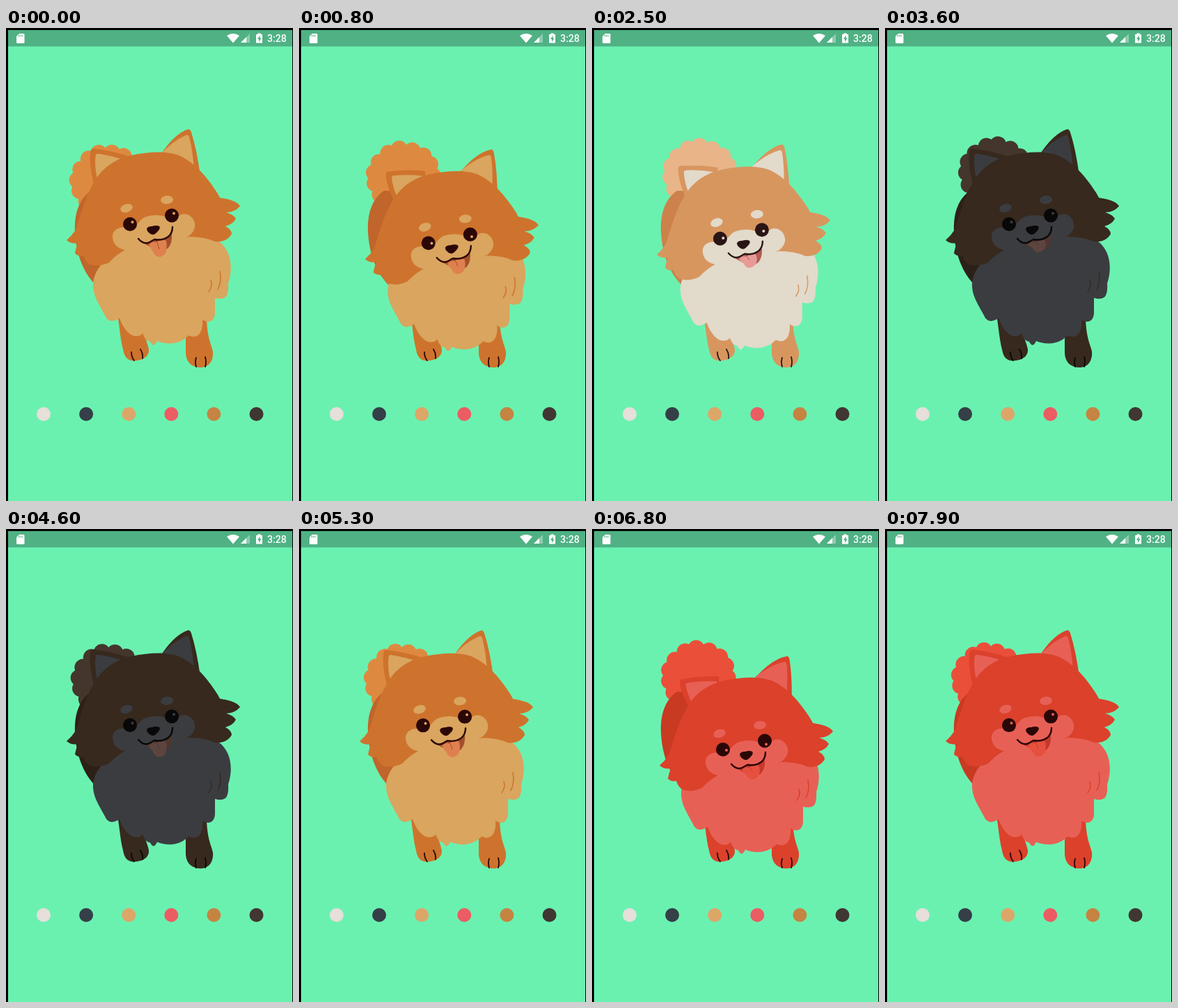
An HTML page that plays this animation: 412 by 680 pixels, repeating every 8000 ms.

```html
<!DOCTYPE html>
<html lang="en">
<head>
<meta charset="utf-8">
<title>Pomeranian</title>
<style>
html, body { margin: 0; width: 100%; height: 100%; overflow: hidden; background: #000; }
svg { display: block; width: 412px; height: 680px; }
.fur { fill: var(--fur); }
.body { fill: var(--body); }
.light { fill: var(--light); }
.tail { fill: var(--tail); }
.dark { fill: var(--dark); }
.mouth { fill: var(--mouth); }
.tongue { fill: var(--tongue); }
.line { fill: none; stroke: var(--dark); stroke-width: 2.4; stroke-linecap: round; stroke-linejoin: round; }
.thin { stroke-width: 1.8; }
.crease { fill: none; stroke: var(--fur); stroke-width: 1.5; stroke-linecap: round; }
.fold { fill: none; stroke: var(--mouth); stroke-width: 1; }
text { font: 500 14px Roboto, sans-serif; fill: #fff; }
</style>
</head>
<body>
<svg viewBox="0 0 412 680">
  <path fill="#6af1b0" d="M3 3h408v677H3z"/>
  <path fill="#4fb184" d="M3 3h408v23.5H3z"/>
  <g fill="#fff">
    <path d="M19 8h6q1.500 0 1.500 1.500v11q0 1.500-1.500 1.500h-8.500q-1.500 0-1.500-1.500V12z"/>
    <path d="M317 11q9-6 18 0l-9 10.500z"/>
    <path opacity=".35" d="M350 8v13h-13z"/>
    <path d="M345 13v8h-8z"/>
    <path d="M361.500 7.500h4V9h2.500v12.500h-9V9h2.500z"/>
    <path fill="#4fb184" d="M364.500 10.500l-3.500 5.500h2v4l3.500-5.500h-2z"/>
  </g>
  <path stroke="#4fb184" stroke-width="1" d="M18.500 10v2.500M20.800 10v2.500M23 10v2.500"/>
  <text x="375" y="20">3:28</text>

  <g id="dog">
    <path id="tail" class="tail"/>
    <path class="body" d="M122 234C102 248 98 272 99 293C101 328 112 352 128 369L190 365V235z"/>
    <path class="fur" d="M159 405C163 428 164 447 168 462C170 476 178 480 188 478C199 477 206 470 205 462C204 454 198 446 198 425z"/>
    <path class="fur" d="M258 425V468C259 482 268 488 279 488C292 488 298 478 297 465C295 455 289 447 288 418z"/>
    <path class="line thin" d="M180 466q0 7 4 12M193 462q4 6 3 13M273 474q-2 6 0 13M286 473q2 7 0 14"/>
    <g id="chest">
      <path class="light" d="M172 316C145 326 124 348 125 372C126 389 138 404 144 417C149 423 156 422 163 417C168 432 178 444 188 443Q193 443 196 439Q200 450 207 451Q212 461 217 450C231 456 250 455 262 442Q273 447 279 438Q283 430 282 419C291 426 300 421 300 409V388Q309 391 315 387Q320 382 319 367C327 343 322 319 306 307Q285 296 255 300z"/>
      <path class="crease" d="M294 363q3 8-3 16M307 350q3 14-3 26"/>
    </g>
    <g id="head">
      <g id="earL">
        <path class="fur" d="M127 227C121 207 119 185 122 175Q124 172 130 174Q155 177 178 185L165 225z"/>
        <path class="light" d="M132 220C128 207 127 190 129 182Q130 180 134 181Q154 184 173 191L160 222z"/>
      </g>
      <g id="earR">
        <path class="fur" d="M222 182Q241 153 260 146Q264 144 266 150Q274 175 279 213L240 220z"/>
        <path class="light" d="M221 182Q242 160 259 154Q262 153 263 157Q268 175 270 204L245 215z"/>
      </g>
      <path class="fur" d="M126 222C138 202 154 189 180 183C207 177 232 177 248 183C264 190 276 202 284 211C294 223 304 237 307 244C318 246 331 248 336 256C331 262 324 265 316 265Q326 268 330 274Q326 282 315 285Q324 290 324 296C319 305 310 308 300 307Q285 300 262 300C235 309 205 309 175 317Q160 324 148 337Q134 344 120 340Q113 335 111 327Q104 329 99 324Q100 318 103 309Q94 311 87 305Q95 298 100 290C108 266 114 242 126 222z"/>
      <path class="light" d="M153 301C152 290 163 285 174 287C188 290 190 274 202 271Q216 267 228 271C238 279 244 272 252 268C264 265 273 276 271 287Q268 297 258 301L245 322H180L170 319Q154 315 153 301z"/>
      <ellipse class="light" cx="173" cy="259" rx="9" ry="6" transform="rotate(-18 173 259)"/>
      <ellipse class="light" cx="231" cy="247" rx="9" ry="6" transform="rotate(-5 231 247)"/>
      <circle class="dark" cx="178" cy="282" r="10"/>
      <circle class="dark" cx="238" cy="269.500" r="10"/>
      <circle id="glintL" r="2" fill="var(--glint)"/>
      <circle id="glintR" r="2" fill="var(--glint)"/>
      <path class="mouth" d="M197 309Q206 309 213 304Q226 306 238 296Q239 309 233 316Q225 323 215 319z"/>
      <path id="tongue" class="tongue"/>
      <path id="fold" class="fold"/>
      <path class="line" d="M190 303Q198 312 206 308Q211 305 213 304Q225 306 233 300Q239 295 239 286"/>
      <path class="dark" d="M202 289Q203 285 210 285Q216 283 220 285Q222 287 219 291Q214 297 211 297Q207 297 203 292z"/>
    </g>
  </g>
  <g id="palette"></g>
</svg>
<script>
const LOOP = 8000;
const $ = id => document.getElementById(id);
const set = (id, attrs) => {
  for (const key in attrs) $(id).setAttribute(key, attrs[key]);
};
const mix = (a, b, k) => a + (b - a) * k;
const clamp = k => Math.max(0, Math.min(1, k));
const ease = k => (1 - Math.cos(Math.PI * clamp(k))) / 2;

const roles = ["fur", "body", "light", "tail", "dark", "mouth", "tongue", "glint"];
const coats = {
  orange: ["#ce732d", "#c0652b", "#d9a55f", "#dd8a40", "#2b0707", "#a34f2b", "#df804f", "#d9a55f"],
  cream: ["#d8965f", "#cc824a", "#e2dacb", "#e8b488", "#2a1515", "#b25c54", "#e89b96", "#e2dacb"],
  charcoal: ["#37291d", "#2c2118", "#3b3c40", "#44362c", "#080808", "#50362f", "#5d453f", "#3b3c40"],
  red: ["#db412b", "#c83a22", "#e76056", "#ea4f39", "#2a0707", "#c8372b", "#e5503f", "#e76056"]
};
const outfits = [[0, "orange"], [900, "cream"], [3100, "charcoal"], [4900, "orange"], [6200, "red"]];

// Time and the number of wags completed by then.
const wags = [[0, 0], [1700, 2.57], [2500, 3.675], [3600, 5.45], [5300, 7.86], [6800, 10.27], [7900, 11.81], [LOOP, 12]];

function wagAt(t) {
  const i = wags.findIndex(([time]) => time > t);
  const [t0, n0] = wags[i - 1], [t1, n1] = wags[i];
  return (1 - Math.cos(2 * Math.PI * mix(n0, n1, (t - t0) / (t1 - t0)))) / 2;
}

function crouchAt(t) {
  const cycle = (t + 4750) % 5000;
  return ease(cycle / 800) - ease((cycle - 1920) / 750);
}

function fluffyTail() {
  const count = 15, points = [];
  for (let i = 0; i < count; i++) {
    const a = i / count * 2 * Math.PI;
    const r = 1 + 0.025 * Math.sin(i * 2.4);
    points.push(`${(159 + 50 * r * Math.cos(a)).toFixed(1)} ${(208 + 47 * r * Math.sin(a)).toFixed(1)}`);
  }
  return `M${points[0]}` + points.slice(1).concat(points[0]).map(p => `A12 12 0 0 1 ${p}`).join("") + "z";
}

function render(t) {
  const coat = coats[outfits.filter(([time]) => time <= t).pop()[1]];
  roles.forEach((role, i) => $("dog").style.setProperty("--" + role, coat[i]));

  const wag = wagAt(t), crouch = crouchAt(t);
  set("tail", { transform: `rotate(${mix(-22, 0, wag)} 180 250)` });
  set("chest", { transform: `translate(${3 * crouch} ${11 * crouch})` });
  set("head", { transform: `translate(${10 * crouch} ${35 * crouch})` });
  set("earL", { transform: `rotate(${-17 * crouch} 148 200)` });
  set("earR", { transform: `rotate(${9 * crouch} 250 200)` });
  set("glintL", { cx: mix(181.5, 183, crouch), cy: mix(279, 283, crouch) });
  set("glintR", { cx: mix(241, 240, crouch), cy: mix(266.5, 274.5, crouch) });

  const tip = 329 - 7 * wag;
  set("tongue", { d: `M205 312Q209 306 216 308Q224 301 230 306Q232 314 229 ${tip - 5}Q225 ${tip} 219 ${tip}Q214 ${tip - 1} 212 ${tip - 6}z` });
  set("fold", { d: `M217 308L220 ${tip - 11}` });
}

set("tail", { d: fluffyTail() });
$("palette").innerHTML = ["#e6dfda", "#353f47", "#dda669", "#eb5d62", "#c58442", "#403632"]
  .map((color, i) => `<circle cx="${54 + 61.1 * i}" cy="555" r="10" fill="${color}"/>`).join("");

const start = performance.now();
function frame(now) {
  render(Math.max(0, now - start) % LOOP);
  requestAnimationFrame(frame);
}
render(0);
requestAnimationFrame(frame);
</script>
</body>
</html>
```
